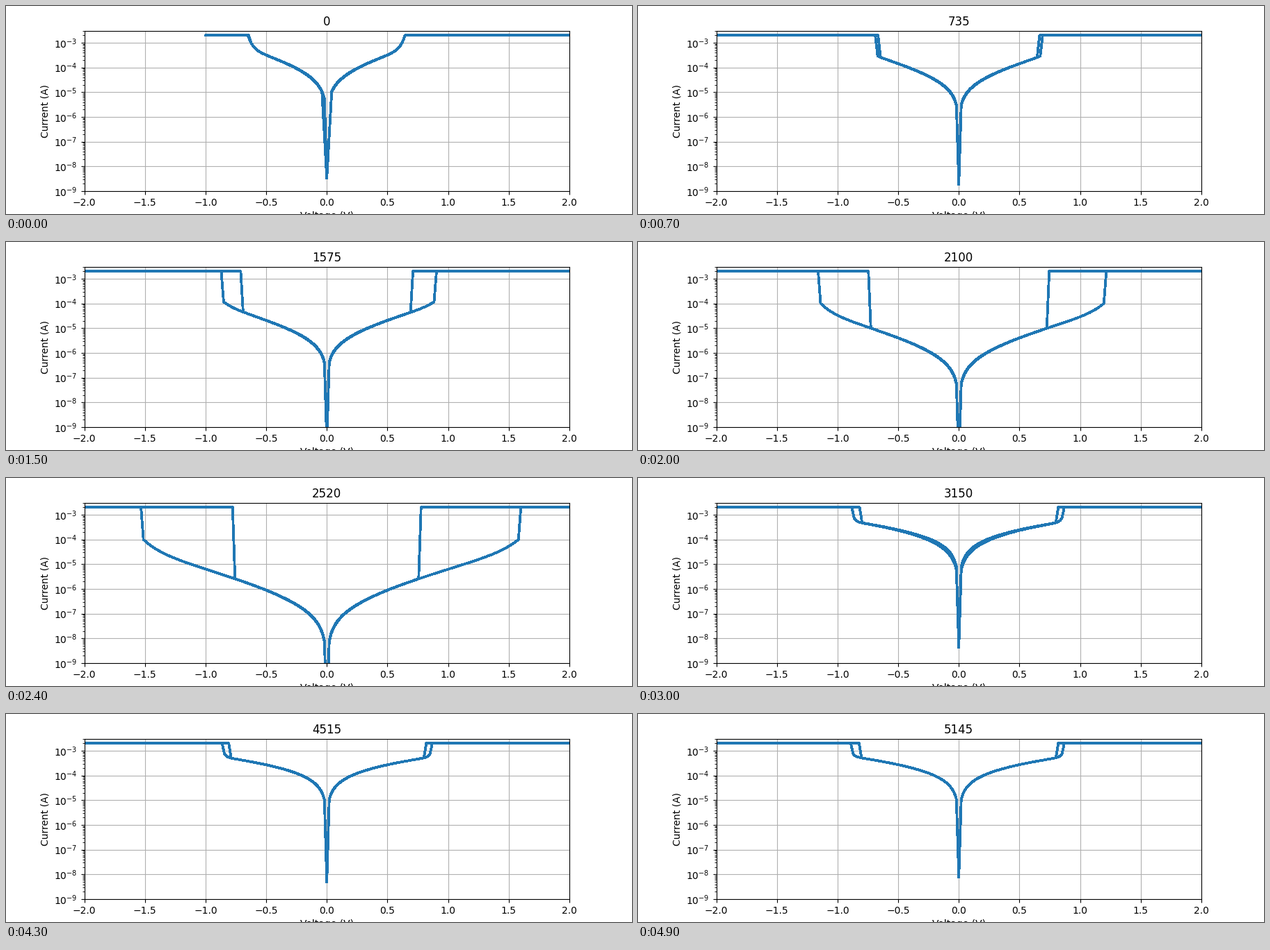
Recreate the animation shown at these times as a matplotlib script. Size 900x300 px, loop 5 s.

```python
import numpy as np
import matplotlib.pyplot as plt
from matplotlib.animation import FuncAnimation

FRAMES, INTERVAL, CYCLES_PER_FRAME = 50, 100, 105
WORN, LIMIT, STEP = 24, 2e-3, 0.02


def worn_state(n):
    """The cell grows more resistive and its switching window opens."""
    u = n / WORN
    hold = 0.625 + 0.132 * u ** 1.5
    near = -5.28 - 2.82 * u ** 2
    return dict(
        positive=(0.645 + 0.935 * u ** 2.9, hold),
        negative=(0.65 + 0.862 * u ** 3.1, hold),
        near=near, mid=-3.51 - 2.54 * u ** 1.64, slope=1.0,
        jump=-4 + 1.3 * (1 - u) ** 3, width=0.04 + 0.11 * u ** 2,
        gap=0.02, floor=near - 3.2)


def settled_state(n):
    """After the sudden recovery the cell settles, with a slow wobble."""
    decay = np.exp(-(n - WORN - 1) / 6)
    wobble = np.cos(2 * np.pi * (n - FRAMES + 1) / 22)
    near = -4.95 - 0.5 * decay
    return dict(
        positive=(0.85, 0.80),
        negative=(0.847 + 0.024 * wobble, 0.79 + 0.012 * wobble),
        near=near, mid=-3.56 - 0.14 * decay, slope=0.28,
        jump=-3.13, width=0.02,
        gap=0.18 * decay, floor=near - 3.3 + 0.15 * wobble)


def branch(threshold, set_v, end, first, gap, state):
    """Current from near zero volts, jumping to the limit past the threshold."""
    near, mid, slope = state["near"], state["mid"], state["slope"]
    power = (mid - near - slope * (0.5 - STEP)) / np.log10(0.5 / STEP)

    def base(v):
        return mid + power * np.log10(v / 0.5) + slope * (v - 0.5)

    v = np.linspace(first, threshold, 90)
    lift = max(state["jump"] - base(set_v), 0)
    log_i = base(v) + lift * np.exp((v - set_v) / state["width"])
    i = np.minimum(10 ** (log_i + gap * np.exp(-v / 0.3)), LIMIT)
    return np.append(v, [threshold + STEP, end]), np.append(i, [LIMIT, LIMIT])


def sweep(n):
    """One full loop: 0 to +V, back through 0 to -V, and back to 0."""
    state = worn_state(n) if n <= WORN else settled_state(n)
    first, negative_end = (2 * STEP, 1) if n == 0 else (STEP, 2)
    volts, amps = [0], [10 ** state["floor"]]
    for sign, side, end in ((1, "positive", 2), (-1, "negative", negative_end)):
        set_v, hold_v = state[side]
        out_v, out_i = branch(set_v, set_v, end, first, -state["gap"], state)
        back_first = first if sign > 0 else STEP
        back_v, back_i = branch(hold_v, set_v, end, back_first, state["gap"], state)
        volts += [*(sign * out_v), *(sign * back_v[::-1]), 0]
        amps += [*out_i, *back_i[::-1], amps[0]]
    return volts, amps


fig, ax = plt.subplots(figsize=(9, 3), dpi=100)
ax.set_yscale("log")
ax.set_xlim(-2, 2)
ax.set_ylim(1e-9, 3e-3)
ax.set_xlabel("Voltage (V)")
ax.set_ylabel("Current (A)")
ax.grid(True)
line, = ax.plot([], [], color="tab:blue", linewidth=2, antialiased=False)
title = ax.set_title("0")


def update(n):
    line.set_data(*sweep(n))
    title.set_text(str(n * CYCLES_PER_FRAME))
    return line, title


anim = FuncAnimation(fig, update, frames=FRAMES, interval=INTERVAL,
                     repeat=True, repeat_delay=0)
plt.show()
```
